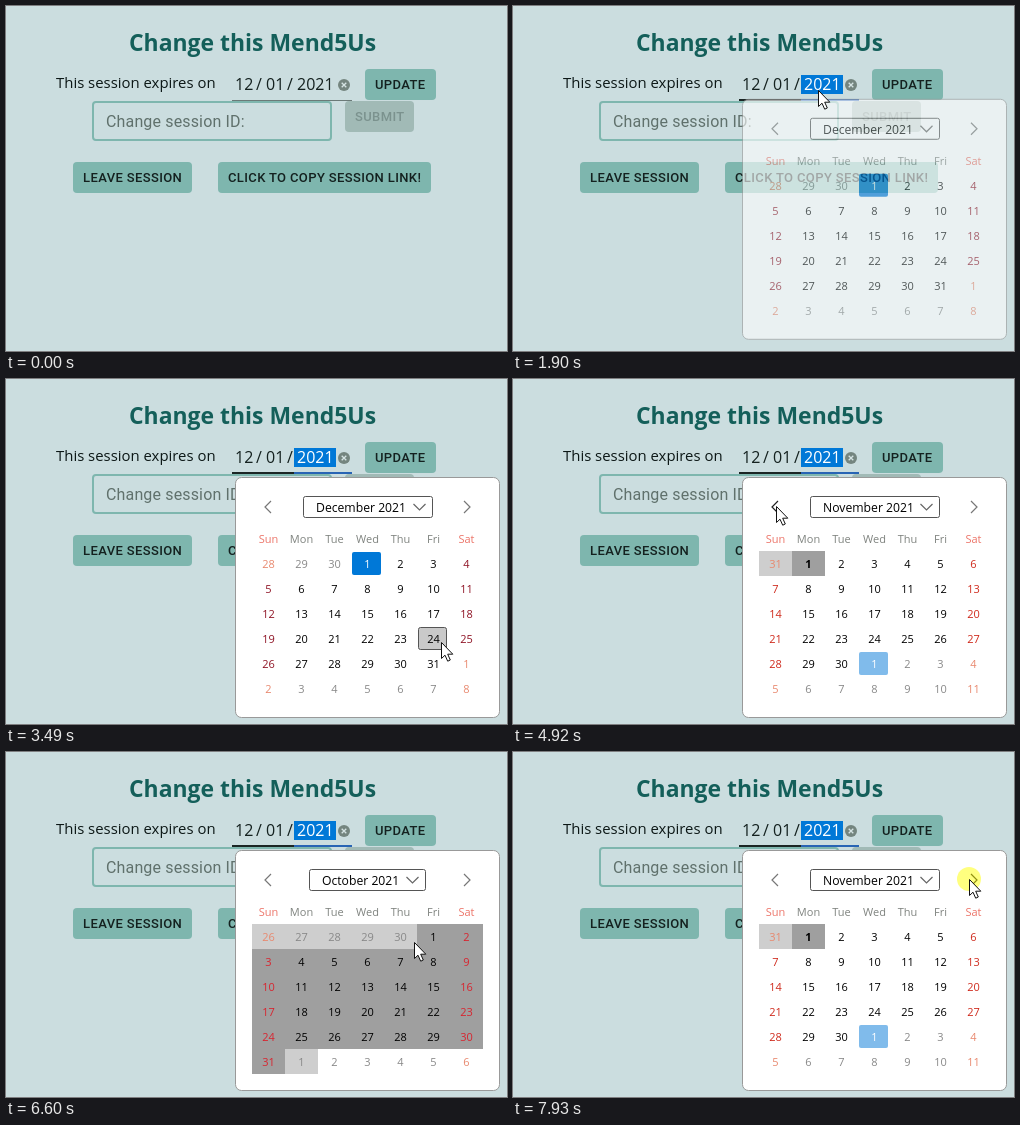
Write an HTML page that moves like this. It is 501 by 345 pixels and loops after 8 s.

```html
<!DOCTYPE html>
<html lang="en">
<head>
<meta charset="utf-8">
<title>Session settings</title>
<style>
  html, body { margin: 0; width: 100%; height: 100%; overflow: hidden; background: #cbdddf; }
  svg { display: block; }
  text { font-family: "Open Sans", "Noto Sans", sans-serif; }
  .roboto { font: 16px Roboto, sans-serif; }
  .label { font: 500 13px Roboto, sans-serif; letter-spacing: .02857em; fill: #14211f; }
  .day { font-size: 11px; text-anchor: middle; }
  .line { fill: none; stroke-width: 1.2; }
</style>
</head>
<body>
<svg width="501" height="345" viewBox="0 0 501 345">
  <text x="123" y="45" font-size="22.95" font-weight="700" fill="#145f5a">Change this Mend5Us</text>
  <text x="50" y="82" font-size="14.9" fill="#0c1716">This session expires on</text>
  <rect id="underline" x="226" width="120"/>
  <rect id="focusLine" x="288" y="93" width="58" height="2" fill="#2864b4"/>
  <rect id="yearMark" x="288" y="69" width="42" height="19" fill="#0078d7"/>
  <g class="roboto" fill="#14211f">
    <text x="229" y="84">12</text><text x="250" y="84">/</text>
    <text x="260" y="84">01</text><text x="281" y="84">/</text>
    <text id="year" x="291" y="84">2021</text>
  </g>
  <circle cx="338" cy="79" r="6" fill="#74857f"/>
  <path d="M335.7 76.7l4.6 4.6m0-4.6l-4.6 4.6" stroke="#d5e3e3" stroke-width="1.3"/>
  <rect id="field" x="87" y="96" width="238" height="38" rx="3" fill="none" stroke-width="2"/>
  <text class="roboto" x="100" y="121" letter-spacing=".15" fill="#60716c">Change session ID:</text>
  <g id="buttons"></g>
  <g id="popup">
    <rect x="229.5" y="98.5" width="264" height="240" rx="6" fill="#fff" stroke="#999"/>
    <g id="calendar"></g>
  </g>
  <circle id="click" r="12" fill="#ff0" fill-opacity=".5"/>
  <path id="cursor" d="M.5 .5V16.5L4 13.2 6.7 19.2 9.3 18 6.7 12.2H11.8Z" fill="#fff" stroke="#111"/>
</svg>
<script>
const LOOP = 8000, STEP = 70;
const $ = id => document.getElementById(id);
const set = (id, attrs) => { for (const k in attrs) $(id).setAttribute(k, attrs[k]); };
const show = (id, on) => set(id, { visibility: on ? 'visible' : 'hidden' });
const within = (p, x, y, w, h) => p.x >= x && p.x < x + w && p.y >= y && p.y < y + h;

// Cursor path: time, x, y
const path = [
  [590, 452, 350], [660, 447, 338], [940, 380, 200], [1080, 322, 110],
  [1150, 308, 77], [1220, 305, 82], [1360, 305, 84], [2430, 305, 84],
  [3280, 400, 251], [3490, 435, 263], [3630, 435, 253], [4030, 435, 253],
  [4720, 263, 127], [6180, 263, 127], [6390, 325, 133], [6600, 408, 190],
  [7020, 439, 266], [7860, 456, 127], [8000, 456, 127]
];
const clicks = [[1620, 1760], [4720, 4920], [5850, 5980], [7930, 8000]];
const monthNames = { 9: 'October', 10: 'November', 11: 'December' };
const weekendColor = { 9: '#d8242f', 10: '#cf2a1c', 11: '#8f1425' };

const button = (x, y, w, text, off) =>
  `<rect x="${x}" y="${y}" width="${w}" height="31" rx="4" fill="${off ? '#a1bab6' : '#7eb6ae'}"/>
   <text class="label" x="${x + 10}" y="${y + 20}" ${off ? 'style="fill:#7b928e"' : ''}>${text}</text>`;
$('buttons').innerHTML = button(359, 63, 71, 'UPDATE') + button(339, 95, 69, 'SUBMIT', true) +
  button(67, 156, 119, 'LEAVE SESSION') + button(212, 156, 213, 'CLICK TO COPY SESSION LINK!');

function cursorAt(t) {
  if (t < path[1][0]) return { x: -50, y: -50 };
  const i = path.findIndex(k => k[0] > t) - 1;
  const [t0, x0, y0] = path[i], [t1, x1, y1] = path[i + 1];
  const p = Math.floor((t - t0) / STEP) * STEP / (t1 - t0);
  return { x: Math.round(x0 + (x1 - x0) * p), y: Math.round(y0 + (y1 - y0) * p) };
}

function dayCell(month, i, cursor) {
  const first = new Date(2021, month, 1).getDay();
  const date = new Date(2021, month, 1 - first + i);
  const col = i % 7, cx = 263 + col * 33, top = 173 + Math.floor(i / 7) * 25;
  const inside = date.getMonth() === month, weekend = col % 6 === 0;
  const today = +date === +new Date(2021, 10, 1);
  const blocked = date <= new Date(2021, 10, 1);
  const picked = +date === +new Date(2021, 11, 1);
  let color = weekend ? (inside ? weekendColor[month] : '#e8886e') : inside ? '#000' : '#888';
  let box = '';
  if (blocked) {
    box = `<rect x="${cx - 17}" y="${top - 1}" width="33" height="25" fill="${inside ? '#9f9f9f' : '#cecece'}"/>`;
  } else if (picked) {
    color = '#fff';
    box = `<rect x="${cx - 16}" y="${top}" width="29" height="23" rx="2" fill="${inside ? '#0078d7' : '#80bbeb'}"/>`;
  } else if (within(cursor, cx - 16, top, 29, 23)) {
    box = `<rect x="${cx - 15.5}" y="${top + .5}" width="28" height="22" rx="2" fill="#c9c9c9" stroke="#555"/>`;
  }
  return `${box}<text class="day" x="${cx - .5}" y="${top + 16}" fill="${color}"
    font-weight="${today && inside ? 700 : 400}">${date.getDate()}</text>`;
}

function calendar(month, cursor) {
  const x = month === 9 ? 303 : 297, w = month === 9 ? 117 : 130, r = x + w;
  const arrow = (ax, dx) => `<path class="line" d="M${ax} 122l${dx} 6l${-dx} 6"
    stroke="${within(cursor, Math.min(ax, ax + dx) - 9, 115, 24, 24) ? '#222' : '#777'}"/>`;
  const head = ['Sun', 'Mon', 'Tue', 'Wed', 'Thu', 'Fri', 'Sat'].map((d, i) =>
    `<text class="day" x="${262.5 + i * 33}" y="164" fill="${i % 6 ? '#7f837f' : '#ec7468'}">${d}</text>`);
  const days = Array.from({ length: 42 }, (_, i) => dayCell(month, i, cursor));
  return arrow(265, -6) + arrow(458, 6) +
    `<rect x="${x + .5}" y="117.5" width="${w - 1}" height="21" rx="2" stroke="#555"
       fill="${within(cursor, x, 117, w, 22) ? '#c9c9c9' : '#fff'}"/>
     <text x="${x + 13}" y="133" font-size="12.2">${monthNames[month]} 2021</text>
     <path class="line" d="M${r - 19.5} 125l6 6l6 -6" stroke="#666"/>` + head.join('') + days.join('');
}

let drawn = '';
function frame(now) {
  const t = now % LOOP, cursor = cursorAt(t);
  const focused = t >= 1690;
  const hover = focused || within(cursor, 226, 63, 120, 32);
  const month = t < 4720 ? 11 : t < 5850 ? 10 : t < 7930 ? 9 : 10;
  const open = Math.max(0, Math.min(1, (t - 1690) / 350));

  set('underline', hover ? { y: 93, height: 2, fill: '#1b2524' } : { y: 94, height: 1, fill: '#6b7a78' });
  show('focusLine', focused);
  show('yearMark', focused);
  set('year', { fill: focused ? '#fff' : '#14211f' });
  set('field', { stroke: !focused && within(cursor, 86, 95, 240, 40) ? '#4f8980' : '#7eb6ae' });
  set('popup', { opacity: open, transform: `translate(0 ${-33 * (1 - open) ** 2})` });
  show('click', clicks.some(([a, b]) => t >= a && t < b));
  set('click', { cx: cursor.x, cy: cursor.y });
  set('cursor', { transform: `translate(${cursor.x} ${cursor.y})` });

  const key = [month, cursor.x, cursor.y].join();
  if (key !== drawn) $('calendar').innerHTML = calendar(month, cursor);
  drawn = key;
}

const start = performance.now();
(function tick() {
  frame(performance.now() - start);
  requestAnimationFrame(tick);
})();
</script>
</body>
</html>
```
